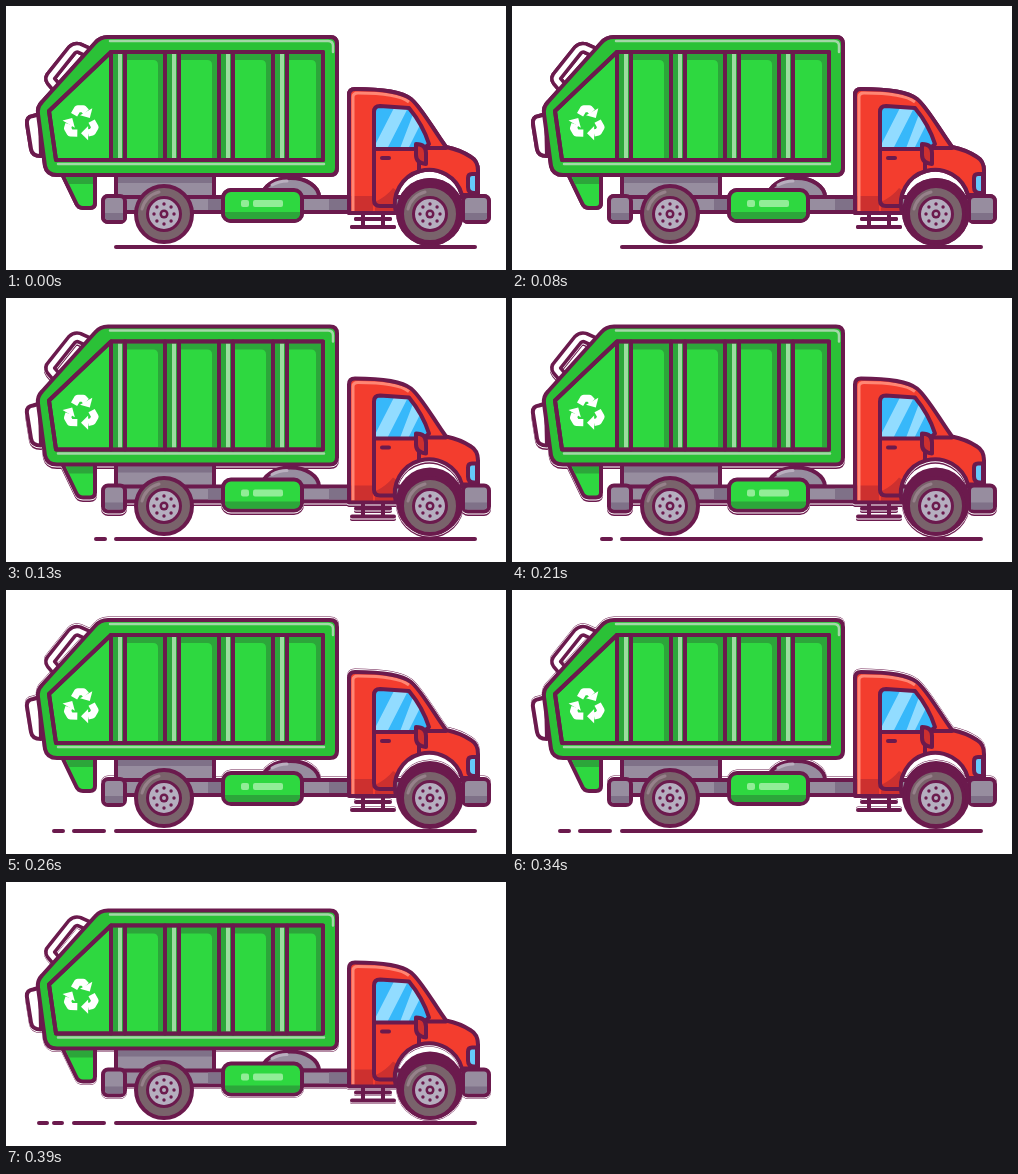
Animation, 500 px wide and 264 px high, one loop 0.52 s. Source, as an HTML page:

```html
<!DOCTYPE html>
<html lang="en">
<head>
<meta charset="utf-8">
<title>Recycling truck</title>
<style>
html, body { margin: 0; width: 100%; height: 100%; overflow: hidden; background: #fff; }
svg { display: block; width: 100%; height: 100%; }
.line { stroke: #6b1a4d; stroke-width: 4; stroke-linecap: round; stroke-linejoin: round; }
.none { fill: none; }
.green { fill: #2ed840; }
.frame { fill: #2bc137; }
.deep { fill: #2ca63a; }
.pale { fill: #9bdc9f; }
.red { fill: #f33d2e; }
.wine { fill: #cd302f; }
.grey { fill: #978d9f; }
.shade { fill: #7f7188; }
</style>
</head>
<body>
<svg viewBox="0 0 500 264">
  <defs>
    <clipPath id="glass"><path d="M368 143V106q0-6 6-6l29 2q14 17 20 36-4 5-12 5z"/></clipPath>
    <clipPath id="cabClip"><path id="cabShape" d="M343 207V89q0-6 6-6 43 0 56 10c10 8 22 30 35 48 10 2 19 6 25 10q7 4 7 14v24H456A34 34 0 0 0 390 207Z"/></clipPath>
  </defs>
  <path id="ground" class="line none"/>
  <use id="echo" href="#body"/>
  <g id="lift"><g id="body">
    <path class="line none" style="stroke-width:12" d="M51 82l-6-7q-2-3 1-6L66 44q3-3 7-2l11 5"/>
    <path class="none" stroke="#fff" stroke-width="5" d="M51 82l-6-7q-2-3 1-6L66 44q3-3 7-2l11 5"/>
    <path class="line" fill="#fff" d="M35 150q-9 0-10-7l-4-25q-1-7 6-8l7-2z"/>
    <path class="line green" d="M56 168l14 29q2 5 7 5h7q5 0 5-5V168z"/>
    <path class="deep" d="M60 171h27v7H63z"/>

    <rect class="line grey" x="110" y="166" width="98" height="27"/>
    <path class="shade" d="M112 171h94v6h-94z"/>
    <path class="line grey" d="M256 191A28.500 19 0 0 1 313 191z"/>
    <path class="none" stroke="#b9afbf" stroke-width="3" stroke-linecap="round" d="M266 179q7-4 15-4"/>
    <rect class="line grey" x="112" y="191" width="348" height="15"/>
    <path class="shade" d="M202 193h14v11h-14zM323 193h20v11h-20z"/>
    <rect class="line grey" x="97" y="190" width="22" height="26" rx="5"/>
    <path class="shade" d="M99 207h18v7H103q-4 0-4-4z"/>

    <path class="line frame" d="M102 31H324q7 0 7 7V162q0 7-7 7H51q-10 0-12-9L32 108q-1-7 4-12L89 37q5-6 13-6Z"/>
    <path class="none" stroke="#a3d8a7" stroke-width="2.500" stroke-linecap="round" d="M104 35H322q5 0 5 5v6M52 158H318"/>
    <path class="line green" d="M105 46H317V154H50L43 105Z"/>
    <g id="panels"></g>
    <path class="line none" d="M105 46H317V154H50L43 105Z"/>

    <g id="recycle" transform="translate(75 117) scale(1.1)" fill="#fff"></g>

    <rect class="line green" x="217" y="184" width="79" height="31" rx="8"/>
    <path class="deep" d="M219 206h75v1q0 6-6 6h-63q-6 0-6-6z"/>
    <g fill="#91ed97">
      <rect x="235" y="194" width="8" height="7" rx="2"/>
      <rect x="247" y="194" width="30" height="7" rx="2"/>
    </g>

    <path class="line none" d="M357 207v13M377 207v13M350 213H384M346 221H388"/>
    <rect class="line grey" x="457" y="190" width="26" height="26" rx="5"/>
    <path class="shade" d="M459 207h22v3q0 4-4 4h-18z"/>
    <circle cx="424" cy="206" r="34" fill="#6b1a4d"/>
    <use href="#cabShape" class="red"/>
    <g clip-path="url(#cabClip)">
      <path class="wine" d="M343 190h24v17h-24zM369 196q12-6 18-14l8 5-7 20h-19z"/>
      <path class="none" stroke="#ff8674" stroke-width="3" d="M347 205V91q0-4 5-4 40 0 51 9"/>
    </g>
    <use href="#cabShape" class="line none"/>
    <path class="line none" d="M368 143V194q0 6 6 6H389M413 155v9M419 142h21"/>
    <g clip-path="url(#glass)">
      <path fill="#37b8fa" d="M366 98h60v48h-60z"/>
      <path fill="#92dcff" d="M390 98h14l-24 47h-14zM409 103l8 10-16 32h-8z"/>
    </g>
    <path class="line none" d="M368 143V106q0-6 6-6l29 2q14 17 20 36-4 5-12 5z"/>
    <path class="line wine" d="M410 138q10 0 10 9v11q-10-1-10-9z"/>
    <path class="line none" d="M376 152h7"/>
    <path class="line" fill="#65cafb" d="M471 168h-5q-4 0-4 4v9q0 6 6 6h3z"/>
  </g></g>
  <g id="wheels"></g>
</svg>
<script>
const $ = id => document.getElementById(id);
const list = (n, fn) => Array.from({ length: n }, (_, i) => fn(i)).join('');

// Ribs are evenly spaced, with a shaded edge on each bay.
$('panels').innerHTML = list(4, i => {
  const x = 105 + 54 * i, end = Math.min(x + 54, 317);
  return `<path class="deep" d="M${x} 48h14v104h-14zM${x + 16} 48H${end - 2}V152h-5V59q0-5-5-5H${x + 16}z"/>
    <path class="pale" d="M${x + 7} 48h4v104h-4z"/>
    <path class="line none" d="M${x} 46V154M${x + 14} 46V154"/>`;
});

$('recycle').innerHTML = list(3, i => `<g transform="rotate(${120 * i})">
  <path class="none" stroke="#fff" stroke-width="6.5" stroke-linejoin="round" d="M-6.300-7.500L-3-13H2L4.700-10"/>
  <path d="M10.300-13.400L8-4.600-.9-7z"/>
</g>`);

function wheel(x) {
  const bolts = list(8, i => {
    const a = i * Math.PI / 4;
    return `<circle cx="${(10 * Math.cos(a)).toFixed(2)}" cy="${(10 * Math.sin(a)).toFixed(2)}" r="1.7"/>`;
  });
  return `<g transform="translate(${x} 208)">
    <circle class="line" r="28" fill="#79636b"/>
    <path class="none" stroke="#96818a" stroke-width="3" stroke-linecap="round" d="M-22-5A23 23 0 0 1-5-22"/>
    <circle class="line" r="16.5" fill="#b5aebf" style="stroke-width:3"/>
    <g fill="#6b1a4d">${bolts}<circle r="4.5"/></g>
    <circle r="2" fill="#b5aebf"/>
  </g>`;
}
$('wheels').innerHTML = wheel(158) + wheel(424);

const STEP = 130;
const lifts = [0, -2.5, -1, -2.5];
const dashes = ['', 'M90 241h9', 'M48 241h9M68 241h30', 'M33 241h8M48 241h8M68 241h30'];

const move = (id, y) => $(id).setAttribute('transform', `translate(0 ${y})`);

function render(now) {
  const i = Math.floor(now / STEP) % lifts.length;
  // The previous pose stays behind the body, parted from it by a thin white rim.
  const last = lifts[Math.max(i - 1, 0)];
  const rim = Math.sign(last - lifts[i]);
  move('lift', lifts[i]);
  move('echo', last);
  $('lift').style.filter = rim ? `drop-shadow(0 ${rim}px 0 #fff)` : 'none';
  $('ground').setAttribute('d', 'M110 241H469' + dashes[i]);
}

function tick() {
  render(performance.now());
  requestAnimationFrame(tick);
}
tick();
</script>
</body>
</html>
```
